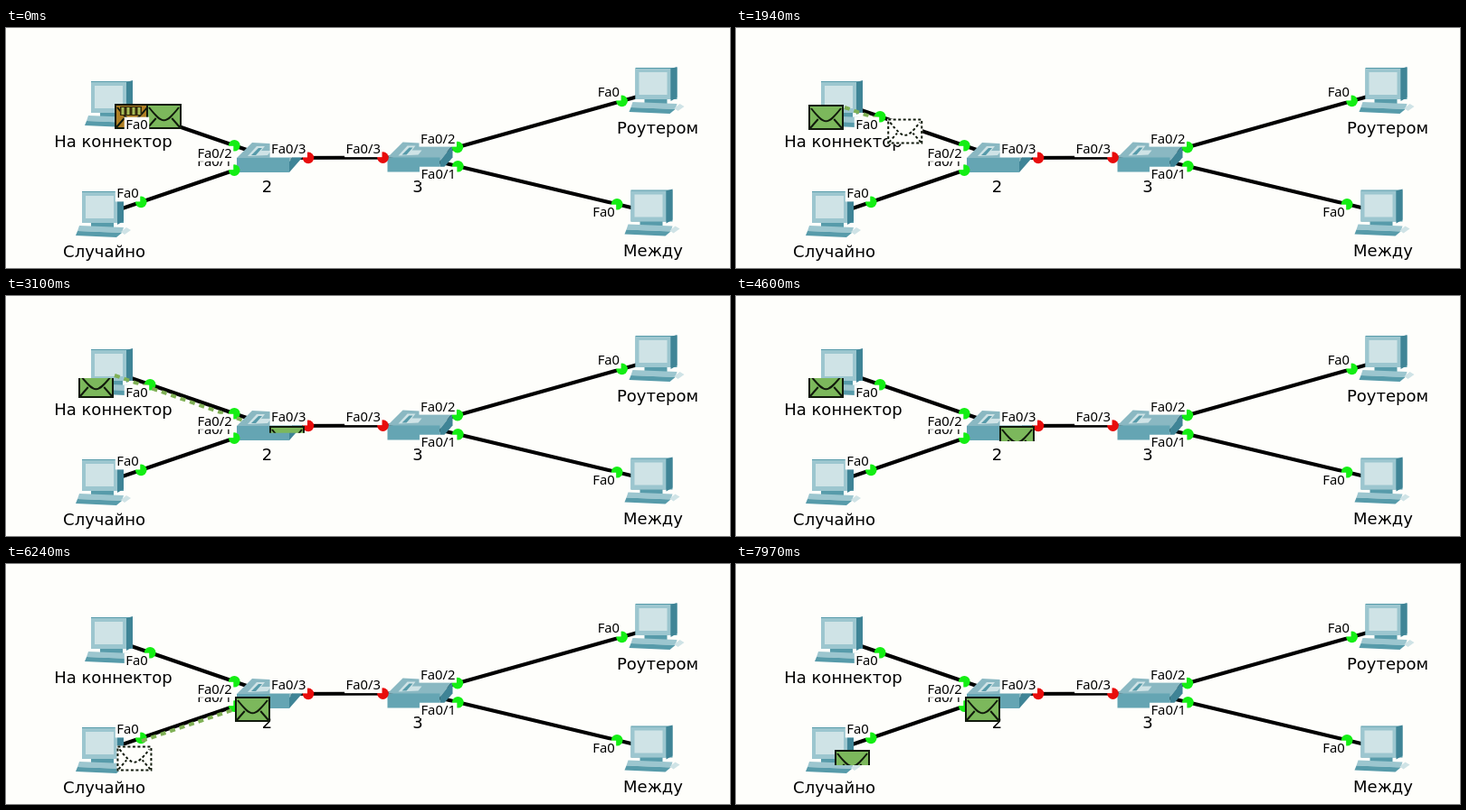
Recreate the animation shown at these times as an HTML page with a canvas. Size 800 by 266 pixels, loop 8 s.

```html
<!DOCTYPE html>
<html lang="ru">
<head>
<meta charset="utf-8">
<title>Network packet</title>
<style>
html, body { margin: 0; width: 100%; height: 100%; overflow: hidden; background: #fefefb; }
canvas { display: block; width: 100vw; height: 100vh; }
</style>
</head>
<body>
<canvas id="stage" width="800" height="266"></canvas>
<script>
const ctx = document.getElementById('stage').getContext('2d');
const LOOP = 8000;
const BG = '#fefefb', GREEN = '#7cb85c', BROWN = '#b08024';
const BODY = '#579baa', LIGHT = '#9cc6cf', DARK = '#3f8496', SCREEN = '#cfe3e6';
const W = 39, H = 28;
const DOT_GAP = 42; // from a device's centre to the light on its cable

const pc = (name, x, y) => ({ name, x, y, port: 'Fa0', label: { x: x - 1, y: y + 47.5 } });
const hub = (name, x, y) => ({ name, x, y, isSwitch: true, label: { x: x - 3.5, y: y + 38 } });

const topLeft = pc('На коннектор', 119.5, 84.5);
const lowLeft = pc('Случайно', 109.5, 206.5);
const topRight = pc('Роутером', 721, 69.5);
const lowRight = pc('Между', 716, 205);
const left = hub('2', 292, 144);
const right = hub('3', 458.5, 143.5);
const devices = [topLeft, lowLeft, topRight, lowRight, left, right];

const cables = [
  { a: lowLeft, b: left, port: 'Fa0/1', color: '#14ee14' },
  { a: topLeft, b: left, port: 'Fa0/2', color: '#14ee14' },
  { a: left, b: right, port: 'Fa0/3', color: '#e80c0c' },
  { a: right, b: topRight, port: 'Fa0/2', color: '#14ee14' },
  { a: right, b: lowRight, port: 'Fa0/1', color: '#14ee14' }
];

const progress = (t, a, b) => Math.min(1, Math.max(0, (t - a) / (b - a)));
const mix = (a, b, p) => a + (b - a) * p;
const along = (a, b, p) => ({ x: mix(a.x, b.x, p), y: mix(a.y, b.y, p) });

// Lights at both ends of every cable, with their port names
const lights = cables.flatMap(({ a, b, port, color }) => {
  const gap = DOT_GAP / Math.hypot(b.x - a.x, b.y - a.y);
  const drop = b.y > a.y ? 13.5 : -4.5;
  return [[a, gap], [b, 1 - gap]].map(([end, p]) =>
    ({ ...along(a, b, p), drop, color, text: end.port || port }));
});

function box(x, y, w, h, color) {
  ctx.fillStyle = color;
  ctx.fillRect(x, y, w, h);
}

function poly(color, ...p) {
  ctx.beginPath();
  for (let i = 0; i < p.length; i += 2) ctx.lineTo(p[i], p[i + 1]);
  ctx.closePath();
  ctx.fillStyle = color;
  ctx.fill();
}

function line(a, b, color, width) {
  ctx.beginPath();
  ctx.moveTo(a.x, a.y);
  ctx.lineTo(b.x, b.y);
  ctx.strokeStyle = color;
  ctx.lineWidth = width;
  ctx.stroke();
}

function at(x, y, paint) {
  ctx.save();
  ctx.translate(x, y);
  paint();
  ctx.restore();
}

function drawPc() {
  box(0, 1, 46, 35, BODY);
  box(0, 2, 39, 34, LIGHT);
  box(4, 6, 31, 25, SCREEN);
  poly(DARK, 39, 2, 46, 0, 46, 34, 39, 38);
  box(10, 36, 25, 6, BODY);
  poly(LIGHT, -3, 39, 46, 41, 44, 47, -5, 45);
  poly(BODY, -5, 45, 44, 47, 38, 52, -7, 50);
  poly(SCREEN, 43, 46, 49, 41, 54, 44, 47, 49);
}

function drawSwitch() {
  poly('#8ab8c2', 0, 17, 17, 0, 72, 3, 58, 21);
  box(0, 17, 58, 16, '#65a5b3');
  poly(DARK, 58, 21, 72, 3, 72, 17, 58, 33);
  poly(SCREEN, 12, 15, 22, 4, 31, 4, 27, 9, 38, 9, 34, 14);
  poly(BODY, 16, 14, 24, 6, 28, 6, 21, 14);
}

// Shows only the rows between from and to
function envelope(x, y, color, from, to) {
  if (to <= from) return;
  at(x, y, () => {
    ctx.beginPath();
    ctx.rect(0, from, W, to - from);
    ctx.clip();
    box(0, 0, W, H, color);
    frame();
    if (color === BROWN) {
      for (let i = 0; i < 4; i++) {
        box(6 + i * 6, 3, 6, 10, '#33280c');
        box(7.5 + i * 6, 4, 3, 8, '#a8bd58');
      }
    }
  });
}

function frame() {
  ctx.strokeStyle = '#111a0c';
  ctx.lineWidth = 2;
  ctx.strokeRect(1, 1, W - 2, H - 2);
  ctx.beginPath();
  ctx.moveTo(3, 4);
  ctx.bezierCurveTo(18, 23, W - 18, 23, W - 3, 4);
  for (const x of [2, W - 2]) {
    ctx.moveTo(x, H - 2);
    ctx.lineTo(mix(x, W / 2, 0.5), 16);
  }
  ctx.stroke();
}

function outline({ x, y }) {
  at(x, y, () => {
    box(0, 0, W, H, BG);
    ctx.setLineDash([3, 2.5]);
    frame();
  });
}

function trail(from, to, p, q) {
  if (q <= p) return;
  at(0, 4, () => {
    ctx.setLineDash([6, 5]);
    line(along(from, to, p), along(from, to, q), '#7fb055', 4);
  });
}

// A dotted copy flies first, its trace stays, then the packet appears row by row
function hop(t, start, from, to, copy) {
  const s = t - start;
  const flown = progress(s, 0, 800);
  trail(from, to, progress(s, 1660, 2360), flown * 0.85);
  copy();
  if (s > -20 && s < 810) outline(along(from, to, flown));
  const rows = 11 * progress(s, 820, 1620) + 6 * progress(s, 1660, 2360) + 11 * progress(s, 3040, 3080);
  envelope(to.x, to.y, GREEN, 0, rows);
}

function drawPackets(t) {
  const atSwitch = { x: 291, y: 144 };
  const gone = H * progress(t, 30, 800);
  envelope(120, 84, BROWN, gone, H);
  envelope(155, 84, GREEN, gone, H);
  if (t < 5240) {
    hop(t < 5040 ? t : 0, 1720, { x: 120, y: 84 }, atSwitch, () =>
      envelope(80, 85, GREEN, t < 2540 ? 0 : 6, H * progress(t, 870, 1670)));
  } else if (t > 5410) {
    hop(t, 5500, atSwitch, { x: 109, y: 206 }, () => envelope(253, 147, GREEN, 0, H));
  }
}

function drawLight({ x, y, color }) {
  ctx.beginPath();
  ctx.arc(x, y, 6.3, 0, Math.PI * 2);
  ctx.fillStyle = color;
  ctx.fill();
}

function drawPort({ x, y, drop, text }) {
  const w = ctx.measureText(text).width;
  box(x - w - 4, y + drop - 13, w + 3, 17, BG);
  ctx.fillStyle = '#000';
  ctx.fillText(text, x - 2.5, y + drop);
}

function draw(t) {
  box(0, 0, 800, 266, BG);
  for (const { a, b } of cables) line(a, b, '#000', 4);
  for (const d of devices) {
    if (d.isSwitch) at(d.x - 37, d.y - 17, drawSwitch);
    else at(d.x - 25.5, d.y - 26.5, drawPc);
  }
  ctx.font = '18px "DejaVu Sans", sans-serif';
  ctx.textAlign = 'center';
  ctx.fillStyle = '#000';
  for (const { name, label } of devices) ctx.fillText(name, label.x, label.y);
  lights.forEach(drawLight);
  drawPackets(t);
  ctx.font = '14.8px "Noto Sans", "Open Sans", sans-serif';
  ctx.textAlign = 'right';
  lights.forEach(drawPort);
}

const begin = performance.now();
function tick() {
  draw((performance.now() - begin) % LOOP);
  requestAnimationFrame(tick);
}
tick();
</script>
</body>
</html>
```
